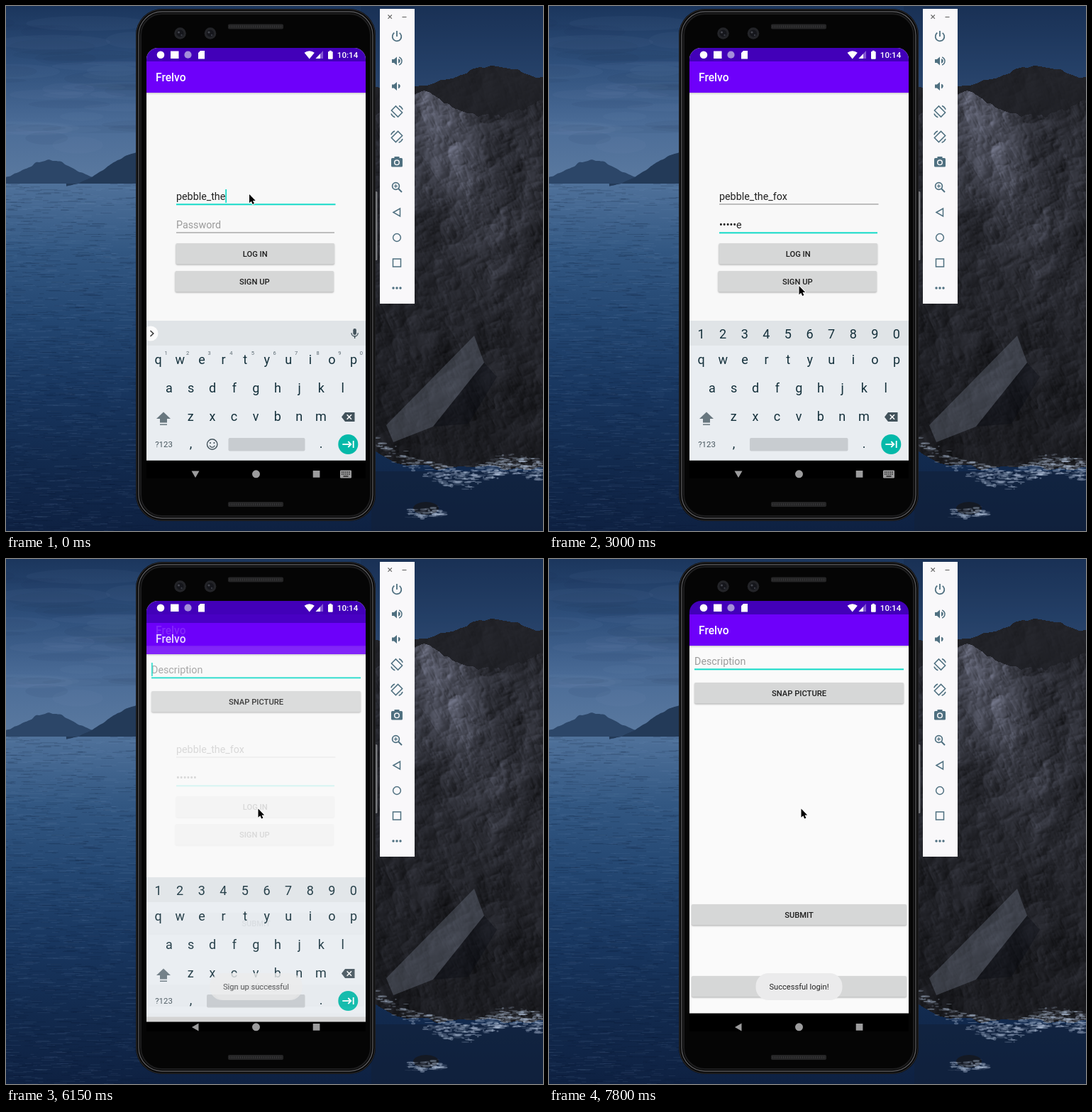
These frames come from a looping animation (757x739 px, 8 s). An HTML page with a canvas:

```html
<!DOCTYPE html>
<html lang="en">
<head>
<meta charset="utf-8">
<title>Phone login</title>
<style>
html, body { margin: 0; width: 100%; height: 100%; overflow: hidden; background: #16305a; }
canvas { display: block; }
</style>
</head>
<body>
<canvas id="stage" width="757" height="739"></canvas>
<script>
const W = 757, H = 739, LOOP = 8000, STEP = 150;
const USER = 'pebble_the_fox', SECRET = 'pebble', TITLE = 'Frelvo';
const TEAL = '#14dac8', ICON = '#4f7080', KEY = '#14303b', KEY_ICON = '#42525b', NAV = '#9c9c9d';
const SCREEN = { x: 198, y: 59, w: 309, h: 606 }, APP_H = 580.5;
const TYPE_USER = 300, FOCUS_SECRET = 1050, TYPE_SECRET = 1500, MASK = 3750;
const TOAST = 4050, SWITCH = 6000;

const screenCtx = document.getElementById('stage').getContext('2d');
let g = screenCtx;

const clamp = (v, lo = 0, hi = 1) => Math.max(lo, Math.min(hi, v));
const smooth = v => v * v * (3 - 2 * v);
const mix = (a, b, p) => a + (b - a) * p;
const bell = (x, mid, width) => Math.exp(-(((x - mid) / width) ** 2));
// keys pressed by time t, one per step
const keysSince = (t, from, max) => clamp((t - from) / STEP + 1, 0, max);

function makeCanvas() {
  const c = document.createElement('canvas');
  c.width = W;
  c.height = H;
  return c;
}

// ---- drawing helpers ----
function rect(x, y, w, h, fill) {
  g.fillStyle = fill;
  g.fillRect(x, y, w, h);
}
function round(x, y, w, h, r, fill) {
  g.beginPath();
  g.roundRect(x, y, w, h, r);
  g.fillStyle = fill;
  g.fill();
}
function disc(x, y, r, fill, ry = r) {
  g.beginPath();
  g.ellipse(x, y, r, ry, 0, 0, 7);
  g.fillStyle = fill;
  g.fill();
}
function ring(x, y, r, color, width = 1.6, from = 0, to = Math.PI * 2) {
  g.beginPath();
  g.arc(x, y, r, from, to);
  g.strokeStyle = color;
  g.lineWidth = width;
  g.stroke();
}
function trace(points) {
  g.beginPath();
  for (let i = 0; i < points.length; i += 2) g.lineTo(points[i], points[i + 1]);
}
function poly(points, fill) {
  trace(points);
  g.closePath();
  g.fillStyle = fill;
  g.fill();
}
function line(points, color, width = 1.6) {
  trace(points);
  g.strokeStyle = color;
  g.lineWidth = width;
  g.stroke();
}
function cross(x, y, r, color, width) {
  line([x - r, y - r, x + r, y + r], color, width);
  line([x + r, y - r, x - r, y + r], color, width);
}
function text(str, x, y, size, color, align = 'left', weight = 400) {
  g.font = `${weight} ${size}px Roboto, sans-serif`;
  g.textAlign = align;
  g.fillStyle = color;
  g.fillText(str, x, y);
}
function fade(y0, y1, ...colors) {
  const gr = g.createLinearGradient(0, y0, 0, y1);
  colors.forEach((c, i) => gr.addColorStop(i / (colors.length - 1), c));
  return gr;
}
function at(x, y, paint) {
  g.save();
  g.translate(x, y);
  paint();
  g.restore();
}

const scratch = makeCanvas();
function layer(alpha, dy, paint) {
  if (alpha <= 0) return;
  const below = g;
  g = scratch.getContext('2d');
  g.clearRect(0, 0, W, H);
  paint();
  g = below;
  g.globalAlpha = alpha;
  g.drawImage(scratch, 0, dy);
  g.globalAlpha = 1;
}

// ---- desktop ----
let seed = 11;
function rnd(a = 0, b = 1) {
  seed = (seed * 16807) % 2147483647;
  return mix(a, b, seed / 2147483647);
}

function hash(x, y) {
  const s = Math.sin(x * 127.1 + y * 311.7) * 43758.5453;
  return s - Math.floor(s);
}
function noise(x, y) {
  const i = Math.floor(x), j = Math.floor(y), p = smooth(x - i), q = smooth(y - j);
  return mix(mix(hash(i, j), hash(i + 1, j), p), mix(hash(i, j + 1), hash(i + 1, j + 1), p), q);
}
// crag height: ridged noise along slanted axes
function crag(x, y) {
  const u = (x * .85 - y * .45) / 60, v = (x * .45 + y * .85) / 85;
  let h = 0;
  for (let f = 1; f < 32; f *= 2) h += (1 - Math.abs(2 * noise(u * f + 7, v * f) - 1)) / f;
  return h;
}

const farRidge = x => 112 - 30 * bell(x, 690, 70) + 4 * noise(x / 9, 1);
const nearRidge = x => 152 - 34 * bell(x, 590, 40) - 22 * bell(x, 757, 35) + 6 * noise(x / 7, 2);
const shore = x => 645 - 25 * bell(x, 515, 30) + 8 * noise(x / 16, 3);

function mountain() {
  const c = makeCanvas(), ctx = c.getContext('2d');
  const img = ctx.createImageData(W, H);
  for (let x = 515; x < W; x++) {
    const top = farRidge(x), near = nearRidge(x), end = shore(x);
    for (let y = Math.ceil(top); y < end; y++) {
      const glow = bell(x, 600 + .35 * (y - 130), 48) * bell(y, 150, 180);
      const base = y < near ? 33 : mix(46, 27, (y - 110) / 530) + 36 * glow;
      const slope = crag(x, y) - crag(x + 2, y + 1.5);
      const b = base * clamp(1 + (y < near ? 1 : 3.2) * slope, .35, 2.3);
      img.data.set([b, b * 1.03, b * 1.2, 255], (y * W + x) * 4);
    }
  }
  ctx.putImageData(img, 0, 0);
  g.drawImage(c, 0, 0);
}

function hill(x0, x1, top, fill) {
  g.beginPath();
  g.moveTo(x0, 250);
  for (let x = x0; x <= x1; x++) g.lineTo(x, top(x) + 3 * noise(x / 6, 4));
  g.lineTo(x1, 250);
  g.fillStyle = fill;
  g.fill();
}

function foam(n, x0, x1, mid, spread) {
  for (let i = 0; i < n; i++) {
    const x = rnd(x0, x1), y = mid(x) + (rnd(-1, 1) + rnd(-1, 1)) * spread;
    disc(x, y, rnd(1, 7), `rgba(178,194,218,${rnd(.08, .5)})`, rnd(.4, 1.7));
  }
}

function scenery() {
  rect(0, 0, W, 250, fade(0, 250, '#1b365d', '#2f507c', '#4b6c97', '#5b7aa0'));
  for (let i = 0; i < 40; i++) {
    disc(rnd(-20, 200), rnd(20, 210), rnd(30, 90), i % 2 ? 'rgba(130,158,196,.05)' : 'rgba(20,40,75,.06)', rnd(3, 12));
  }
  rect(500, 0, 257, 180, 'rgba(24,43,76,.45)');

  rect(0, 247, W, 492, fade(247, 739, '#50729b', '#325782', '#234671', '#18365f', '#122a4e', '#0e2142'));
  for (let i = 0; i < 1800; i++) {
    const y = 250 + 489 * rnd();
    rect(rnd(-20, 190), y, rnd(5, 24), 1, i % 2 ? 'rgba(125,158,198,.1)' : 'rgba(5,18,45,.17)');
  }
  hill(0, 140, x => 246 - 31 * bell(x, 62, 48), '#2c4668');
  hill(85, 190, x => 254 - 50 * bell(x, 190, 62), '#233a58');

  mountain();
  poly([660, 464, 536, 590, 546, 614, 602, 592, 674, 502], 'rgba(122,130,146,.34)');
  poly([674, 502, 692, 522, 652, 588, 602, 592], 'rgba(8,11,18,.4)');

  rect(515, 655, 242, 84, 'rgba(17,33,58,.6)');
  foam(380, 600, W, x => 655 + 9 * Math.sin(x / 24), 9);
  foam(70, 521, 600, x => 618 + (x - 521) * .45, 7);
  disc(592, 707, 18, '#141923', 9);
  foam(60, 568, 618, () => 713, 5);
}

function outline(inset, radius, color, width) {
  g.beginPath();
  g.roundRect(183 + inset, 4 + inset, 338 - 2 * inset, 721 - 2 * inset, radius - inset);
  g.strokeStyle = color;
  g.lineWidth = width;
  g.stroke();
}

function phoneBody() {
  round(520, 261, 3.5, 97, 1.5, '#77787c');
  round(183, 4, 338, 721, 37, '#050505');
  outline(1, 37, '#232325', 1.5);
  outline(4, 37, '#57575a', 1.4);
  outline(7, 37, '#1d1d1e', 2);
  for (const y of [25.5, 698]) {
    round(313, y, 78, 7, 2, '#252526');
    for (let x = 315; x < 390; x += 3) rect(x, y + 2, 1, 3, '#353537');
  }
  for (const x of [245.5, 288]) {
    disc(x, 38.5, 8.3, '#232428');
    disc(x, 38.5, 5, '#15161b');
    disc(x - 2, 37, 1.6, '#44464e');
    disc(x + 2, 41, 1.2, '#383a43');
  }
}

function speaker(waves) {
  rect(-7, -2.5, 4, 5, ICON);
  poly([-4, -2.5, 0, -6, 0, 6, -4, 2.5], ICON);
  g.beginPath();
  g.arc(1.5, 0, 3.2, -1.4, 1.4);
  g.fill();
  if (waves) ring(1, 0, 6, ICON, 1.6, -1.2, 1.2);
}

function rotateIcon(flip) {
  g.scale(flip, 1);
  g.rotate(Math.PI / 4);
  g.strokeRect(-6.5, -4.3, 13, 8.6);
  ring(0, 0, 8.6, ICON, 1.5, -2, -1.1);
  ring(0, 0, 8.6, ICON, 1.5, 1.1, 2);
}

function camera() {
  round(-8, -5.5, 16, 12.5, 1.5, ICON);
  rect(-3.5, -7.5, 7, 3, ICON);
  ring(0, .7, 3.3, '#f9f8fa', 1.5);
}

function magnifier() {
  ring(-1.5, -1.5, 4.9, ICON, 1.7);
  line([2, 2, 7, 7], ICON, 2);
  rect(-4, -2.1, 5, 1.2, ICON);
  rect(-2.1, -4, 1.2, 5, ICON);
}

function toolbar() {
  rect(527, 4, 49, 415, '#f9f8fa');
  cross(541.2, 15.2, 2.7, '#666', 1.1);
  rect(558.5, 15, 6, 1.1, '#666');
  const icons = [
    () => { ring(0, 1, 6.3, ICON, 1.8, -.95, 4.1); line([0, -7, 0, 1], ICON, 1.8); },
    () => speaker(true),
    () => speaker(false),
    () => rotateIcon(1),
    () => rotateIcon(-1),
    camera,
    magnifier,
    () => { trace([-5, 0, 4.5, -5.5, 4.5, 5.5]); g.closePath(); g.stroke(); },
    () => ring(0, 0, 5.4, ICON, 1.5),
    () => g.strokeRect(-5.5, -5.5, 11, 11),
    () => [-5, 0, 5].forEach(x => disc(x, 0, 1.7, ICON))
  ];
  icons.forEach((paint, i) => at(551, 42 + i * 35.5, () => {
    g.strokeStyle = ICON;
    g.lineWidth = 1.5;
    paint();
  }));
}

// ---- app parts ----
function frame(bg) {
  const { x, y, w } = SCREEN;
  rect(x, y, w, APP_H, bg);
  rect(x, 122, w, 3, fade(122, 125, '#c9c9cb', bg));
  rect(x, y, w, 19, '#4200b9');
  rect(x, 78, w, 44, '#6e00fa');
  text(TITLE, 211, 106, 15.6, '#fff', 'left', 500);
}

function button(label, x, y, w, press = 0) {
  g.shadowColor = 'rgba(0,0,0,.3)';
  g.shadowBlur = 2;
  g.shadowOffsetY = 1;
  round(x, y, w, 29.5, 2, '#d6d7d7');
  g.shadowColor = 'transparent';
  round(x, y, w, 29.5, 2, `rgba(0,0,0,${press})`);
  text(label, x + w / 2, y + 19, 11.2, '#1d1d1d', 'center', 500);
}

function field(value, hint, x, w, y, focused, caret) {
  text(value || hint, x, y, 14.3, value ? '#202020' : '#9b9b9b');
  if (focused) rect(x, y + 5.3, w, 2, TEAL);
  else rect(x, y + 5.5, w, 1, '#868686');
  if (focused && caret) rect(x + (value ? g.measureText(value).width : 0), y - 15, 1.7, 19, TEAL);
}

// the newest letter stays readable until it is masked
function secretAt(t) {
  const n = keysSince(t, TYPE_SECRET, SECRET.length);
  const shown = t < MASK ? SECRET.slice(Math.max(0, n - 1), n) : '';
  return '•'.repeat(n - shown.length) + shown;
}

function loginScreen(t, caret) {
  const onSecret = t >= FOCUS_SECRET;
  const press = from => .07 * clamp(1 - Math.abs(t - from) / 300);
  frame('#f8f8f8');
  field(USER.slice(0, 10 + keysSince(t, TYPE_USER, 4)), 'Username', 240, 224.5, 273, !onSecret, caret);
  field(secretAt(t), 'Password', 240, 223, 313, onSecret, caret);
  button('LOG IN', 239.5, 334, 223.5, press(5625));
  button('SIGN UP', 238.5, 373, 223.5, press(3600));
}

function postScreen(caret) {
  frame('#fafafa');
  field('', 'Description', 205, 295, 149, true, caret);
  button('SNAP PICTURE', 205, 174, 295);
  button('SUBMIT', 201, 486, 303);
  button('', 201, 587, 303);
}

function keyRow(keys, x, y, size = 18, color = KEY) {
  [...keys].forEach((k, i) => text(k, x + i * 30.6, y, size, color, 'center'));
}

function suggestionStrip() {
  g.save();
  g.beginPath();
  g.rect(SCREEN.x, 443, SCREEN.w, 35);
  g.clip();
  disc(204, 461, 10.5, '#fcfcfc');
  g.restore();
  line([203.5, 457, 207.8, 461, 203.5, 465], '#333', 1.5);
  round(489.3, 454, 4.6, 9, 2.3, KEY_ICON);
  ring(491.6, 460.2, 4.6, KEY_ICON, 1.4, 0, Math.PI);
  rect(490.9, 465, 1.4, 3, KEY_ICON);
  keyRow('1234567890', 225.5, 491, 7.5, '#5c6a72');
}

function smiley(x, y) {
  ring(x, y, 7.2, KEY_ICON, 1.4);
  for (const dx of [-2.7, 2.7]) disc(x + dx, y - 2, 1.1, KEY_ICON);
  ring(x, y + .5, 3.7, KEY_ICON, 1.3, .3, 2.84);
}

function keyboard(digits) {
  rect(SCREEN.x, 443, SCREEN.w, 196.5, '#e9edf1');
  rect(SCREEN.x, 443, SCREEN.w, 35, '#e0e4e7');
  if (digits) keyRow('1234567890', 214.5, 468);
  else suggestionStrip();
  keyRow('qwertyuiop', 214.7, 504);
  keyRow('asdfghjkl', 230, 544);
  keyRow('zxcvbnm', 260.3, 584);

  poly([222, 571.5, 232, 581, 212, 581], '#68777f');
  rect(217, 581, 10, 5.5, '#68777f');
  rect(217, 588.5, 10, 1.5, '#68777f');
  poly([473, 578.5, 478, 572, 491.5, 572, 491.5, 585, 478, 585], KEY_ICON);
  cross(483.8, 578.5, 3.2, '#fff', 1.5);

  text('?123', 222.5, 621, 11.4, '#47565e', 'center');
  text(',', 260.5, 622, 18, KEY, 'center');
  text('.', 444, 622, 18, KEY, 'center');
  const left = digits ? 283 : 313.5;
  round(left, 608, 421.5 - left, 18.5, 2, '#c8ccd0');
  if (!digits) smiley(290.7, 617);
  at(482.3, 617, () => {
    disc(0, 0, 14, '#04b9a9');
    line([-8, 0, 4, 0], '#fff', 1.8);
    line([0, -4, 4, 0, 0, 4], '#fff', 1.8);
    line([7.4, -5, 7.4, 5], '#fff', 1.8);
  });
}

function toast(label) {
  g.font = '400 11.1px Roboto, sans-serif';
  const w = g.measureText(label).width + 38;
  round(352.5 - w / 2, 583, w, 38, 18, '#ebebec');
  text(label, 352.5, 606, 11.1, '#222', 'center');
}

function statusBar() {
  disc(218, 68.8, 5.3, '#fff');
  rect(232, 63.5, 11.5, 10.5, '#fff');
  disc(256.5, 68.7, 5.1, '#a48fda');
  poly([274, 63, 280, 63, 280, 74.5, 271, 74.5, 271, 66], '#fff');
  g.beginPath();
  g.moveTo(427.7, 74.5);
  g.arc(427.7, 74.5, 11.3, -2.25, -.89);
  g.fillStyle = '#fff';
  g.fill();
  poly([447, 63, 447, 74, 436.5, 74], 'rgba(255,255,255,.35)');
  poly([443, 67.2, 443, 74, 436.5, 74], '#fff');
  round(454, 64, 6.7, 10.8, 1, '#fff');
  rect(455.8, 62.8, 3, 2, '#fff');
  text('10:14', 466.8, 73, 11.6, '#fff', 'left', 500);
}

function navBar(typing) {
  at(267, 659, () => {
    g.rotate(typing ? 0 : Math.PI / 2);
    poly([-5.5, -4.5, 5.5, -4.5, 0, 5], NAV);
  });
  disc(352.5, 658.8, 5.5, NAV);
  rect(432.7, 654, 9.7, 9.7, NAV);
  if (!typing) return;
  round(471, 653.5, 16, 11, 1.2, NAV);
  for (let i = 0; i < 10; i++) rect(473 + i % 5 * 2.6, 655.5 + (i > 4) * 2.7, 1.4, 1.4, '#111');
  rect(475.5, 661.3, 7, 1.3, '#111');
}

function mouse(t) {
  const down = smooth(clamp((t - 2340) / 510));
  const up = smooth(clamp((t - 4800) / 450));
  at(343 + 9.5 * down + 3 * up, 265 + 129 * down - 42.5 * up, () => {
    trace([0, 0, 0, 12.2, 2.8, 9.7, 4.7, 14, 6.9, 13, 5, 8.9, 8.7, 8.9]);
    g.closePath();
    g.lineJoin = 'round';
    g.strokeStyle = '#fff';
    g.lineWidth = 1.8;
    g.stroke();
    g.fillStyle = '#000';
    g.fill();
  });
}

// solid while typing, then blinking
function caretOn(t) {
  const blink = (from, half) => t < from || Math.floor((t - from) / half) % 2 === 0;
  return t < SWITCH ? blink(2250, 470) : blink(SWITCH + STEP, 510);
}

const backdrop = makeCanvas();
g = backdrop.getContext('2d');
scenery();
phoneBody();
toolbar();
g = screenCtx;

function draw(t) {
  const n = (t - SWITCH) / STEP;   // steps into the screen change
  const caret = caretOn(t);
  const { x, y, w, h } = SCREEN;
  g.drawImage(backdrop, 0, 0);
  g.save();
  g.beginPath();
  g.roundRect(x, y, w, h, [16, 16, 0, 0]);
  g.clip();
  rect(x, y, w, h, '#000');

  if (n < 4) loginScreen(t, caret && n < 0);
  if (n >= 0) {
    layer(n < 4 ? 1 - .6 * .25 ** n : 1, Math.round(30 * .4 ** n), () => postScreen(caret));
  }
  const slide = Math.max(0, n) / 2;
  layer(clamp(1 - .35 * slide ** 2), Math.round(15 * slide ** 1.6), () => keyboard(t >= FOCUS_SECRET));
  statusBar();
  navBar(n < 1);

  const swap = clamp(n * .3);
  layer(swap, 0, () => toast('Successful login!'));
  if (t >= TOAST) layer(clamp(.08 + (t - TOAST) / 470) * (1 - swap), 0, () => toast('Sign up successful'));
  g.restore();
  mouse(t);
}

const start = performance.now();
function tick() {
  const t = (performance.now() - start) % LOOP;
  draw(Math.floor(t / STEP) * STEP);
  requestAnimationFrame(tick);
}
tick();
</script>
</body>
</html>
```
